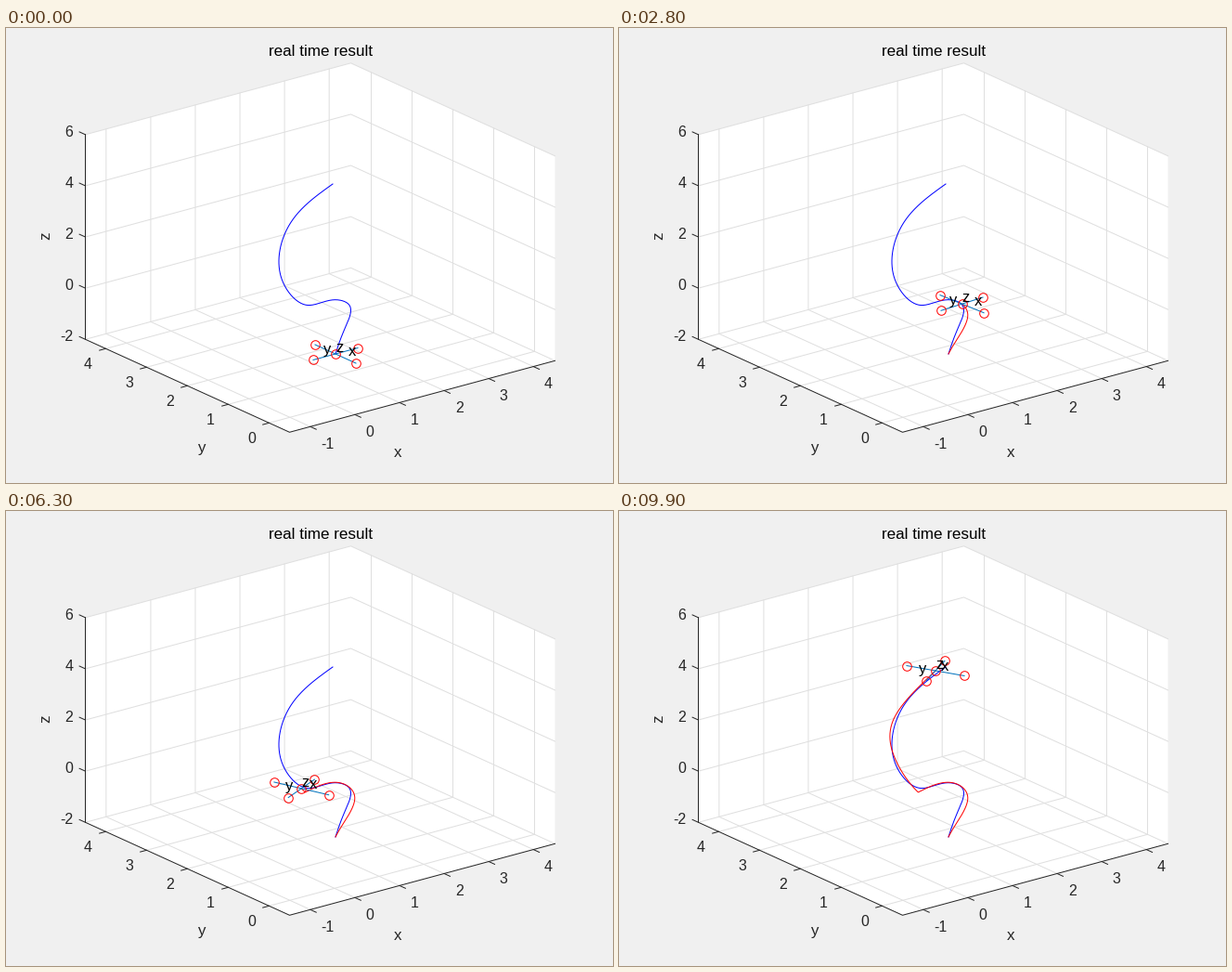
A matplotlib script that plays this animation: 654 px wide and 490 px high, repeating every 10000 ms.

```python
import numpy as np
import matplotlib.pyplot as plt
from matplotlib.animation import FuncAnimation

W, H, DPI = 654, 490, 100
FRAMES, STEP = 100, 100
PX = 72 / DPI
DARK, GRID = "#262626", "#dfdfdf"

plt.rcParams["font.family"] = "Liberation Sans"
fig = plt.figure(figsize=(W / DPI, H / DPI), dpi=DPI, facecolor="#f0f0f0")
ax = fig.add_axes([0, 0, 1, 1])
ax.set_xlim(0, W)
ax.set_ylim(H, 0)
ax.axis("off")

# Orthographic box: front corner plus one edge vector per axis
ORIGIN = np.array([305.5, 435.3])
EDGE = np.array([[286, -77], [-220, -100], [0, -220.5]])
LOW = np.array([-1.465, -0.5, -2])
HIGH = np.array([4.485, 4.5, 6])
UNIT = EDGE / (HIGH - LOW)[:, None]


def project(*point):
    return ORIGIN + (np.array(point) - LOW) @ UNIT


def line(points, color, **kw):
    return ax.plot(*np.transpose(points), color=color, lw=PX, **kw)[0]


def label(x, y, text, size, color=DARK, **kw):
    return ax.text(x, y, text, fontsize=size * PX, color=color,
                   va="baseline", **kw)


def spline(t, p, at, rest_start=False, rest_end=False):
    """Smooth cubic spline; each end is either free or at rest."""
    t, p = np.asarray(t, float), np.asarray(p, float)
    h = np.diff(t)
    d = np.diff(p, axis=0) / h[:, None]
    a, r = np.eye(len(t)), np.zeros_like(p)
    for i in range(1, len(t) - 1):
        a[i, i - 1:i + 2] = h[i], 2 * (h[i - 1] + h[i]), h[i - 1]
        r[i] = 3 * (h[i] * d[i - 1] + h[i - 1] * d[i])
    if not rest_start:
        a[0, :2], r[0] = (2, 1), 3 * d[0]
    if not rest_end:
        a[-1, -2:], r[-1] = (1, 2), 3 * d[-1]
    m = np.linalg.solve(a, r)

    k = np.clip(np.searchsorted(t, at, side="right") - 1, 0, len(h) - 1)
    u, h = ((at - t[k]) / h[k])[:, None], h[k][:, None]
    return ((1 + 2 * u) * (1 - u) ** 2 * p[k] + u * (1 - u) ** 2 * h * m[k]
            + u * u * (3 - 2 * u) * p[k + 1] + u * u * (u - 1) * h * m[k + 1])


def tick(base, step, offset, text, ha):
    line([base, base + step], DARK)
    label(*(base + offset), text, 16, ha=ha)


def draw_box():
    (x0, y0, z0), (x1, y1, z1) = LOW, HIGH
    outline = [project(*c) for c in (
        (x0, y0, z0), (x1, y0, z0), (x1, y0, z1),
        (x1, y1, z1), (x0, y1, z1), (x0, y1, z0))]
    ax.fill(*np.transpose(outline), color="white", lw=0)

    for x in range(-1, 5):
        line([project(x, y0, z0), project(x, y1, z0), project(x, y1, z1)], GRID)
        tick(project(x, y0, z0), (6.4, 2.9), (11.7, 23.3), str(x), "left")
    for y in range(5):
        line([project(x0, y, z0), project(x1, y, z0), project(x1, y, z1)], GRID)
        tick(project(x0, y, z0), (-6.8, 1.8), (-14.5, 21.3), str(y), "right")
    for z in range(-2, 7, 2):
        line([project(x0, y1, z), project(x1, y1, z), project(x1, y0, z)], GRID)
        tick(project(x0, y1, z), (-6.4, -2.9), (-13.3, 1.7), str(z), "right")

    line([project(x0, y1, z1), project(x0, y1, z0),
          project(x0, y0, z0), project(x1, y0, z0)], DARK)
    label(339, 30.3, "real time result", 17, "black", ha="center")
    label(422, 462.3, "x", 17, ha="center")
    label(210, 457.3, "y", 17, ha="center")
    label(43, 225, "z", 17, ha="center", rotation=90)


draw_box()

# Planned path through a few waypoints, spaced by distance
plan = [(355, 351), (364.5, 325), (369.6, 298), (356, 292.7), (324, 298.4),
        (301, 279), (294, 250), (306.5, 210), (352, 168)]
chord = np.r_[0, np.cumsum(np.hypot(*np.diff(plan, axis=0).T))]
line(spline(chord, plan, np.linspace(0, chord[-1], 300)), "blue")

# Flown path: a waypoint every LAP seconds, with one halt at the sharp turn
LAP, SUB = 1.1, 5
leg_1 = [(355, 351), (362.5, 338), (375.8, 309),
         (358.5, 292.5), (333.5, 297.5), (322.5, 303)]
leg_2 = [leg_1[-1], (314.8, 294.8), (297.8, 267.5), (296, 224), (341, 172)]
clock = np.arange((FRAMES - 1) * SUB + 1) / (10 * SUB) / LAP
halt = len(leg_1) - 1
flown = np.vstack([
    spline(range(len(leg_1)), leg_1, clock[clock < halt], True, True),
    spline(range(len(leg_2)), leg_2, clock[clock >= halt] - halt, True)])

trail = line([(0, 0)], "red")
arms = [line([(0, 0)], "#0072bd") for _ in range(2)]
rotors = line([(0, 0)], "red", ls="none", marker="o", ms=9.6 * PX,
              mfc="none", mew=PX)
names = [label(0, 0, s, 16.6, "black", ha="left") for s in "xyz"]


def body_axes(t):
    """Screen vectors of the two arms while the vehicle yaws by 0.52 rad."""
    u = np.clip((t - 1) / 8, 0, 1)
    yaw = 0.52 * u * u * (3 - 2 * u)
    c, s = 0.5 * np.cos(yaw), 0.5 * np.sin(yaw)
    return np.array([[c, s], [-s, c]]) @ UNIT[:2]


def update(i):
    pos = flown[i * SUB]
    ex, ey = body_axes(i / 10)
    trail.set_data(*flown[:i * SUB + 1].T)
    for arm, e in zip(arms, (ex, ey)):
        arm.set_data(*np.transpose([pos - e, pos + e]))
    rotors.set_data(*np.transpose([pos, pos + ex, pos - ex, pos + ey, pos - ey]))
    for name, tip in zip(names, (0.58 * ex, 0.58 * ey, 0.3 * UNIT[2])):
        name.set_position(pos + tip + (0, 6))
    return [trail, *arms, rotors, *names]


anim = FuncAnimation(fig, update, frames=FRAMES, interval=STEP,
                     init_func=lambda: update(0), repeat=True, repeat_delay=0)
plt.show()
```
